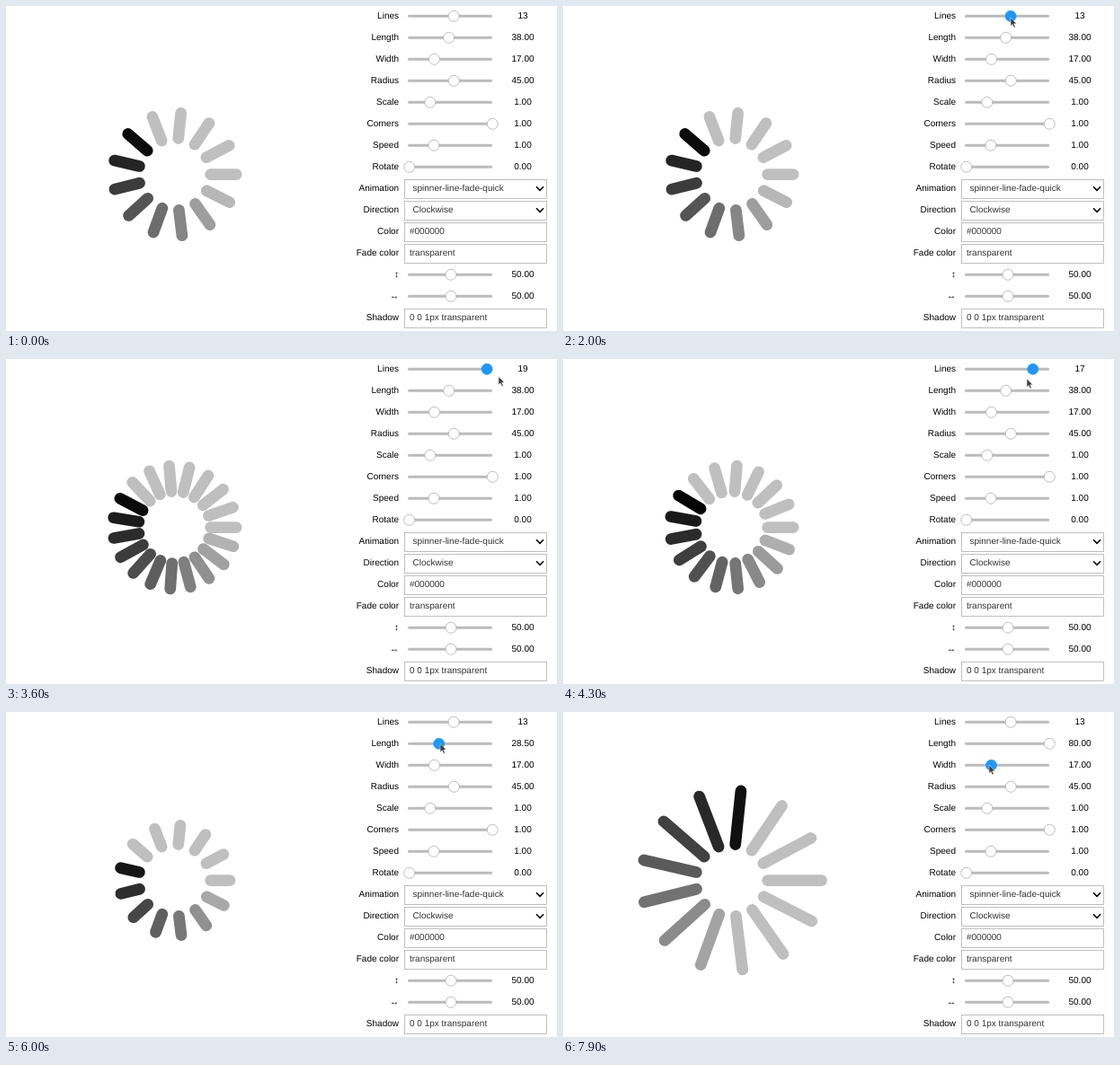
These frames come from a looping animation (613 by 362 pixels, 8000 ms). An HTML page:

```html
<!DOCTYPE html>
<html lang="en">
<head>
<meta charset="utf-8">
<style>
html, body { margin: 0; width: 100%; height: 100%; overflow: hidden; background: #fff; }
svg { display: block; }
text { font: 10px "Liberation Sans", Arial, sans-serif; text-rendering: geometricPrecision; }
.label { text-anchor: end; }
.value { text-anchor: middle; }
.field { fill: #333; }
.box { fill: #fff; stroke: #aaa; stroke-width: .75; }
.track { stroke: #bbb; stroke-width: 3; stroke-linecap: round; }
.thumb { fill: #fff; stroke: #aaa; stroke-width: .75; }
.thumb.on { fill: #2196f3; stroke: #2196f3; }
.chevron { fill: none; stroke: #000; stroke-width: 1.6; }
</style>
</head>
<body>
<svg width="613" height="362" viewBox="0 0 613 362">
  <g id="spinner" transform="translate(187.5 187.5) scale(.75)"></g>
  <g id="panel"></g>
  <path id="cursor" d="M0 0V9.4L2.1 7.4L3.7 11L5.3 10.3L3.7 6.8H6.7Z" fill="#3c3c3c" stroke="#fff" stroke-width=".5"/>
</svg>
<script>
const LOOP = 8, STEP = 0.1, ROW = 24;
const WIDTH = 17, RADIUS = 45, MAX_LINES = 20;

const slider = (name, value, min, max) => ({ name, value, min, max });
const field = (name, text, isSelect) => ({ name, text, isSelect });

const rows = [
  slider("Lines", 13, 5, MAX_LINES),
  slider("Length", 38, 0, 80),
  slider("Width", WIDTH, 2, 52),
  slider("Radius", RADIUS, 0, 84),
  slider("Scale", 1, 0, 4),
  slider("Corners", 1, 0, 1),
  slider("Speed", 1, 0.5, 2.2),
  slider("Rotate", 0, 0, 90),
  field("Animation", "spinner-line-fade-quick", true),
  field("Direction", "Clockwise", true),
  field("Color", "#000000"),
  field("Fade color", "transparent"),
  slider("↕", 50, 0, 100),
  slider("↔", 50, 0, 100),
  field("Shadow", "0 0 1px transparent"),
];

// key points: time, then the values to move between
const linesDrag = [[2.49, 13], [3.69, 19], [4.1, 19], [4.875, 13]];
const lengthDrag = [[5.7, 38], [6.05, 27], [6.68, 80]];
const pointer = [
  [0.1, 44, 0], [0.9, 392, 46], [1.2, 457, 28], [1.7, 498, 13], [2.5, 498, 13],
  [3.69, 552, 20], [4.3, 516, 22], [4.8, 497, 23], [5.3, 498, 25],
  [6.05, 482, 36], [6.8, 560, 42], [7.1, 562, 43], [7.8, 474, 59],
];
const focusTimes = [1.7, 5.6, 7.8];

function along(keys, t) {
  const next = keys.findIndex(key => key[0] > t);
  if (next === 0) return keys[0].slice(1);
  if (next < 0) return keys[keys.length - 1].slice(1);
  const a = keys[next - 1], b = keys[next];
  const k = (t - a[0]) / (b[0] - a[0]);
  return a.slice(1).map((v, i) => v + (b[i + 1] - v) * k);
}

const linesAt = t => Math.round(along(linesDrag, t)[0]);
const lengthAt = t => Math.round(along(lengthDrag, t)[0] * 2) / 2;

// every change of a setting restarts the spinner
const restarts = [-1.05];
for (let k = 1; k < LOOP * 200; k++) {
  const now = k / 200, before = (k - 1) / 200;
  if (linesAt(now) !== linesAt(before) || lengthAt(now) !== lengthAt(before)) restarts.push(now);
}

const byId = id => document.getElementById(id);
const spinner = byId("spinner"), panel = byId("panel"), cursor = byId("cursor");

function add(parent, tag, attrs, content = "") {
  const node = document.createElementNS("http://www.w3.org/2000/svg", tag);
  for (const key in attrs) node.setAttribute(key, attrs[key]);
  node.textContent = content;
  return parent.appendChild(node);
}

function setSlider({ thumb, label, name, min, max }, value) {
  thumb.setAttribute("cx", 448.75 + 92.5 * (value - min) / (max - min));
  label.textContent = name === "Lines" ? value : value.toFixed(2);
}

rows.forEach((row, i) => {
  const mid = 11.25 + ROW * i, base = mid + 2.7;
  add(panel, "text", { class: "label", x: 437, y: base }, row.name);
  if (row.text) {
    add(panel, "rect", { class: "box", x: 443.5, y: mid - 9.75, width: 158, height: 21 });
    add(panel, "text", { class: "field", x: row.isSelect ? 452.5 : 449, y: base }, row.text);
    if (row.isSelect) add(panel, "path", { class: "chevron", d: `M590 ${mid - 2}l4 4l4 -4` });
  } else {
    add(panel, "path", { class: "track", d: `M448.5 ${mid}H539.5` });
    row.thumb = add(panel, "circle", { class: "thumb", cy: mid, r: 6 });
    row.label = add(panel, "text", { class: "value", x: 575, y: base });
    setSlider(row, row.value);
  }
});

const bars = Array.from({ length: MAX_LINES }, () =>
  add(spinner, "rect", { x: RADIUS, y: -WIDTH / 2, height: WIDTH, rx: WIDTH / 2 }));

function fade(phase) {
  const p = phase - Math.floor(phase);
  if (p < 0.39) return 0.25;
  if (p < 0.4) return 0.25 + (p - 0.39) * 75;
  return 1 - (p - 0.4) * 1.25;
}

function draw(ms) {
  const t = Math.floor(ms / 1000 % LOOP / STEP) * STEP + 1e-6;
  const lines = linesAt(t), length = lengthAt(t);
  const elapsed = t - restarts.filter(r => r <= t).pop();

  bars.forEach((bar, i) => {
    bar.setAttribute("width", length + WIDTH);
    bar.setAttribute("transform", `rotate(${Math.floor(360 / lines * i)})`);
    bar.setAttribute("opacity", i < lines ? fade(elapsed - i / lines) : 0);
  });

  setSlider(rows[0], lines);
  setSlider(rows[1], length);
  const focus = focusTimes.filter(f => f <= t).length - 1;
  focusTimes.forEach((_, i) => rows[i].thumb.classList.toggle("on", i === focus));

  cursor.setAttribute("visibility", t < STEP ? "hidden" : "visible");
  cursor.setAttribute("transform", `translate(${along(pointer, t)})`);
  requestAnimationFrame(draw);
}
draw(0);
</script>
</body>
</html>
```
